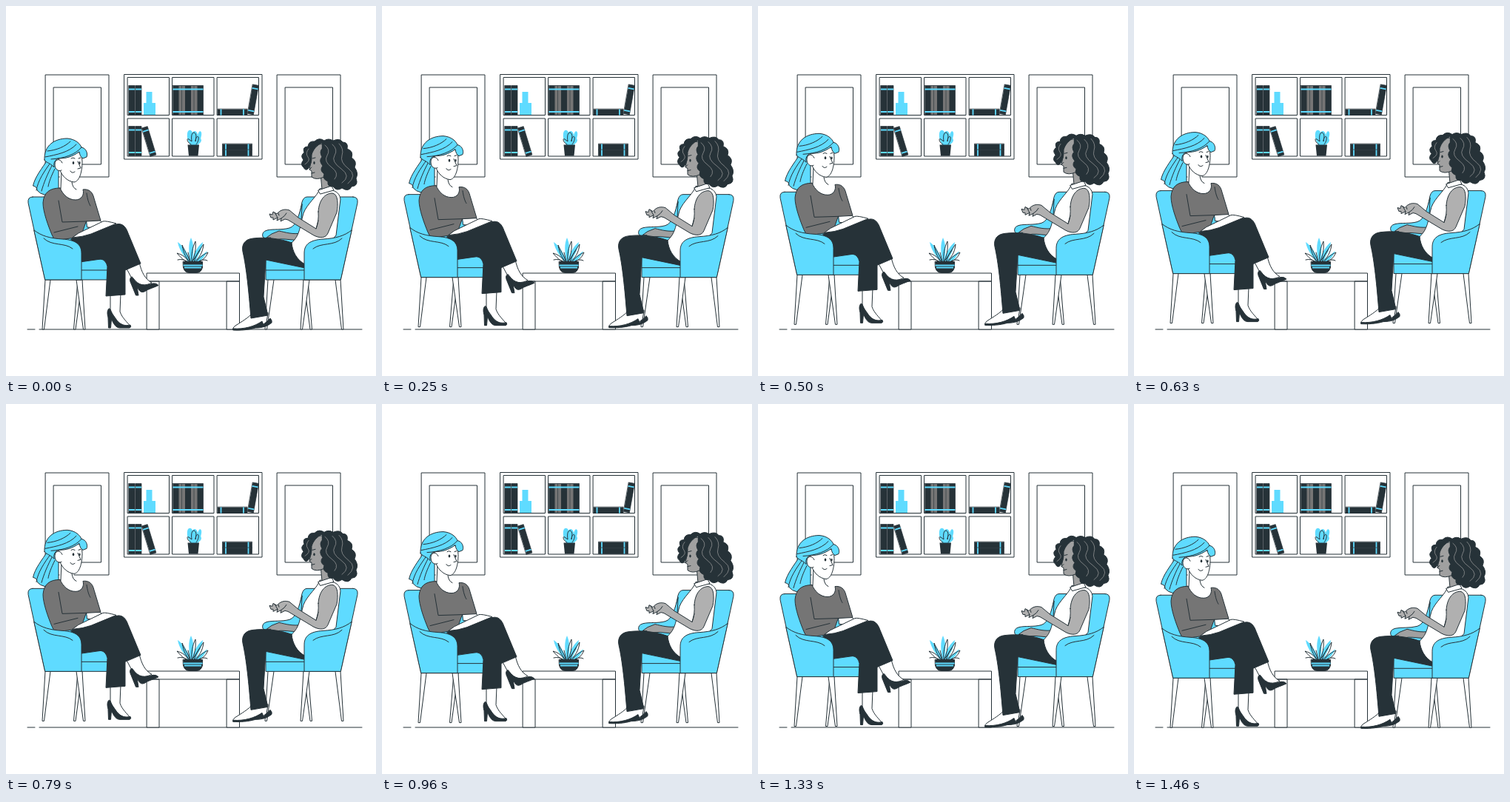
An HTML page that plays this animation: 500 px wide and 500 px high, repeating every 1500 ms.

```html
<!DOCTYPE html>
<html lang="en">
<head>
<meta charset="utf-8">
<title>Conversation</title>
<style>
  html, body { margin: 0; width: 100%; height: 100%; overflow: hidden; background: #fff; }
  svg { display: block; width: 100%; height: 100%; stroke: #263238; stroke-linejoin: round; stroke-linecap: round; }
  .w { fill: #fff; }
  .b { fill: #5fdbff; }
  .k { fill: #263238; }
  .g { fill: #757575; }
  .s { fill: #a0a0a0; }
  .a { fill: #b0b0b0; }
  .n { fill: none; }
  .x { stroke: none; }
  .band { fill: none; stroke: #5fdbff; stroke-width: 1.8; stroke-linecap: butt; }
  .curl { fill: none; stroke: #a0a0a0; stroke-width: .7; }
</style>
</head>
<body>
<svg viewBox="0 0 500 500">
  <defs>
    <g id="frame" class="w">
      <rect x="53.5" y="93" width="85.500" height="138"/>
      <rect x="64.5" y="110" width="64" height="104"/>
    </g>
    <rect id="cell" class="w" width="56" height="51"/>
    <g id="book">
      <rect class="k" width="8" height="40" stroke-width=".7"/>
      <path class="band" d="M0 5H8M0 35.500H8"/>
    </g>
    <g id="legs" class="w">
      <path d="M97 370L91.500 437H94L103 370Z"/>
      <path d="M95 370L104.500 437H107L103 370Z"/>
      <path d="M53 370L49 437H51.500L60 370Z"/>
    </g>
    <g id="seat" class="b">
      <path d="M36 258H98Q103 258 105 265L114 310L102 370H53L38 303L30 266Q29 258 36 258Z"/>
      <path d="M95 342H154V370H95ZM95 357H154"/>
    </g>
    <g id="armrest">
      <path class="b" d="M38 303C48 311 60 314 76 315C94 316 102 322 102 334V370H53Z"/>
      <path class="n" d="M51 314C62 325 79 319 90 328"/>
    </g>
  </defs>

  <!-- wall and floor -->
  <use href="#frame"/>
  <use href="#frame" x="313"/>
  <rect class="w" x="160" y="92.500" width="186" height="114.500"/>
  <use href="#cell" x="164.500" y="96.500"/>
  <use href="#cell" x="225" y="96.500"/>
  <use href="#cell" x="285.500" y="96.500"/>
  <use href="#cell" x="164.500" y="152"/>
  <use href="#cell" x="225" y="152"/>
  <use href="#cell" x="285.500" y="152"/>
  <use href="#book" x="166" y="107.500"/>
  <use href="#book" x="175" y="107.500"/>
  <use href="#book" x="166" y="162.500"/>
  <use href="#book" x="175" y="162.500"/>
  <use href="#book" transform="translate(183.500 165) rotate(-17)"/>
  <use href="#book" transform="translate(333.500 106) rotate(10)"/>
  <use href="#book" transform="translate(326 139.500) rotate(90)"/>
  <use href="#book" transform="translate(332.500 186.500) rotate(90)"/>
  <use href="#book" transform="translate(332.500 194.500) rotate(90)"/>
  <path class="b x" d="M186 147V131H189.500V116H197.500V131H202V147Z"/>
  <path class="k" stroke-width=".7" d="M225.500 107.500H266.500V147.500H225.500Z"/>
  <path class="g x" d="M233.500 108H242V147H233.500ZM250 108H258.500V147H250Z"/>
  <path class="n" stroke-width=".6" d="M237.500 108V147M254 108V147"/>
  <path class="band" d="M225.500 112.500H266.500M225.500 143H266.500"/>
  <path class="b x" d="M249 188C247 183 244 180 245 172C246 166 251 167 252 171C254 167 259 169 259 175C260 169 263 168 264 171C265 176 262 178 264 181C264 185 260 186 259 188Z"/>
  <path class="n" d="M250 187C244 184 244 178 247 180L251 183C250 176 251 171 254 171C258 172 257 178 256 183C256 179 258 175 260 177C261 181 258 186 257 187"/>
  <path class="k x" d="M245.500 187.500H261L259.500 202.500H247Z"/>
  <path d="M29 437H39M45 437H481"/>

  <!-- table -->
  <path class="w" d="M190.500 372H207V437H190.500ZM298.500 372H315.500V437H298.500ZM190.500 361H315.500V372H190.500Z"/>
  <path class="b x" d="M246 346C240 336 234 330 232 319C240 324 246 336 249 343C247 332 246 322 250 313C254 322 254 332 252 342C254 333 259 325 266 319C265 329 259 338 257 343L272 331C269 339 263 345 258 347Z"/>
  <path class="n" d="M247 346C243 339 238 336 231 334C239 343 242 345 247 346M249 346C245 336 241 330 238 323C240 335 244 342 249 346M251 346C250 336 252 326 256 318C257 329 255 339 251 346M254 346C257 336 262 329 267 322C266 333 261 341 254 346M257 346C261 339 267 336 273 333C269 342 264 345 257 346M246 346Q239 341 232 343M259 346Q266 341 272 344M249 345L246 333M252 345L262 330"/>
  <path class="k" d="M239.500 345.500H265.500V353Q264 360.500 257 360.500H248Q241 360.500 239.500 353Z"/>
  <path class="band" d="M239.500 350.500H265.500M241 353.500H264"/>

  <g id="float">
    <!-- left side -->
    <use href="#legs"/>
    <use href="#seat"/>
    <path class="b" d="M56 208C49 219 39 231 36.500 243Q42 244 42 249Q46 254 52 255Q61 257 71 262V222L68 208Z"/>
    <path class="n" d="M60 212C52 223 43 236 41 249M63 214C56 227 51 239 48 250M66 220C61 230 58 238 57 244"/>
    <path class="w x" d="M73 222H90L92 247L107 249L98 264H82L72 248Z"/>
    <path class="n" d="M75 222L74 247M89 238Q90 246 95 248"/>
    <path class="w" d="M71 206L73 222C76 230 83 237 92 238C99 237 103 225 103 210L102 198L84 197Z"/>
    <path class="w" d="M76 212C73 205 66 207 66 214C66 221 71 224 75 222"/>
    <path class="b" d="M52 208C51 188 66 179 83 179C94 180 100 186 102 191C108 192 111 199 109 204L104 206Q100 204 99 197C89 204 81 206 72 206C66 207 64 212 65 218C60 212 54 212 52 208Z"/>
    <path class="n" d="M53 204C68 201 85 198 95 187M61 207C78 206 94 201 102 191M56 196C68 195 80 190 87 183"/>
    <path class="n" d="M97 210L101 219L97 220M87 223Q89 227 93 224M88 206Q90 204 93 206M98 206L101 205"/>
    <ellipse class="k x" cx="91" cy="212" rx="1.300" ry="2"/>
    <ellipse class="k x" cx="99.500" cy="212" rx="1.100" ry="1.900"/>
    <path class="w" d="M141 388V412L150 425Q158 434 168 433C164 427 157 422 154 413L155 388Z"/>
    <path class="k" d="M139 409C136 412 137 417 138 421L138.500 435H141.500L142.500 423C146 431 149 435 154 435H167Q170 434 168 431C160 433 153 430 149 424Q143 417 141 410Z"/>
    <path class="w" d="M163 355L171 370C178 379 190 378 197 374C188 369 183 360 180 346Z"/>
    <path class="k" d="M170 366C167 367 167 371 169 375L175.500 391H179L177 379C180 385 182 388 187 386C193 382 199 381 206 377.500Q203 374 198 375C188 379 179 378 172 368Z"/>
    <path class="k" d="M88 315C112 306 136 298 149 295C157 293 162 298 165 307L182 348L161 357V390L135 392L137 352Q135 343 128 342L100 346Z"/>
    <path class="g" d="M73 246C59 246 51 252 50 266C50 278 57 297 62 309L66 317L101 312L108 292L128 290L119 260C117 251 112 247 104 248C106 255 102 262 94 262C84 262 77 255 73 246Z"/>
    <path class="n" d="M71 263L76 292L109 291M109 253C110 261 112 267 114 270M65 306L97 298"/>
    <path class="w" d="M109 291L127 290L134 296L124 300L110 299Z"/>
    <path class="w" d="M98 307L131 291Q135 290 149 294L115 308Q104 312 90 313Z"/>
    <use href="#armrest"/>

    <!-- right side -->
    <path class="w" d="M354 370L350 437H352.500L362 370Z"/>
    <g transform="translate(505) scale(-1 1)">
      <use href="#legs"/>
      <use href="#seat"/>
    </g>
    <path class="b" d="M400 268C396 281 393 297 383 300C372 303 362 301 353 303Q345 305 347 312Q352 317 364 318L397 321Z"/>
    <path class="s" d="M400 307C387 309 378 306 369 304L359 308L352 313L358 313L355 316C362 317 370 314 376 315L399 317Z"/>
    <path class="w" d="M333 415C328 421 318 427 310 432Q305 436 308 437C326 438 344 434 352 427L354 415Z"/>
    <path class="k" d="M307 436C322 437 336 433 346 426L348 431L357 422Q360 425 359 428C353 433 346 435 337 435C327 438 316 438.500 307 438Z"/>
    <path class="w" d="M424 247C421 257 407 267 402 280C397 297 398 310 385 321L388 345L408 353L446 310L452 261Q451 253 444 250Z"/>
    <path class="k" d="M386 320C370 314 350 312 334 314C323 315 318 322 320 332C325 354 328 385 331 422L354 418L348 393L351 343L404 354V349C393 343 387 332 386 320Z"/>
    <path class="s" d="M425 226L427 248Q435 250 440 243L438 218Z"/>
    <path class="w" d="M422 249L440 243L443 249L425 254Z"/>
    <path class="a" d="M422 278C423 262 431 253 441 253C449 254 449 268 447 279L435 307C432 314 424 314 416 310L381 289L377 288L371 291L372 287L366 290L367 286L361 289L361 286L358 286L356 281L360 282L361 278L366 281C371 275 377 274 383 276L395 286L419 301Q423 291 422 278Z"/>
    <path class="n" d="M363 279L367 286M368 280L369 283M372 287Q377 284 379 280M419 301L422 290"/>
    <path class="s" d="M420 187C411 193 412 203 412 211L410 221L413 223L413 231Q419 236 430 231L440 218L435 187Z"/>
    <path class="n" d="M413 226L417 225M414 206L418 205M413 218L410 221"/>
    <ellipse class="k x" cx="416.500" cy="212" rx="1.200" ry="2"/>
    <path class="k" d="M427 185C420 188 415 194 413 201C413 208 413 212 409 219Q405 224 402 218Q397 214 402 208Q397 202 403 198Q400 190 408 190Q409 182 417 183Q423 177 430 182Q436 178 442 182Q451 178 455 184Q463 184 461 193Q470 196 467 205Q475 210 471 218Q477 226 473 233Q477 243 467 244Q463 252 454 246Q447 251 442 244Q434 245 435 237Q427 234 430 227Q423 222 428 216Q422 209 427 204Q423 197 427 193Z"/>
    <path class="curl" d="M431 188Q439 194 434 202T440 218T444 234M441 187Q449 194 444 202T453 220T454 239M450 186Q457 193 454 202T463 220T462 240M409 193Q404 199 408 204T404 214"/>
    <use href="#armrest" transform="translate(505) scale(-1 1)"/>
  </g>
</svg>
<script>
  const PERIOD = 1500, RISE = 10, PHASE = 30;
  const scene = document.getElementById('float');

  // Constant-speed rise and fall
  function draw() {
    const p = ((performance.now() + PHASE) / PERIOD) % 1;
    const y = 0.4 - RISE * (1 - Math.abs(1 - 2 * p));
    scene.setAttribute('transform', `translate(0 ${y.toFixed(3)})`);
    requestAnimationFrame(draw);
  }
  draw();
</script>
</body>
</html>
```
